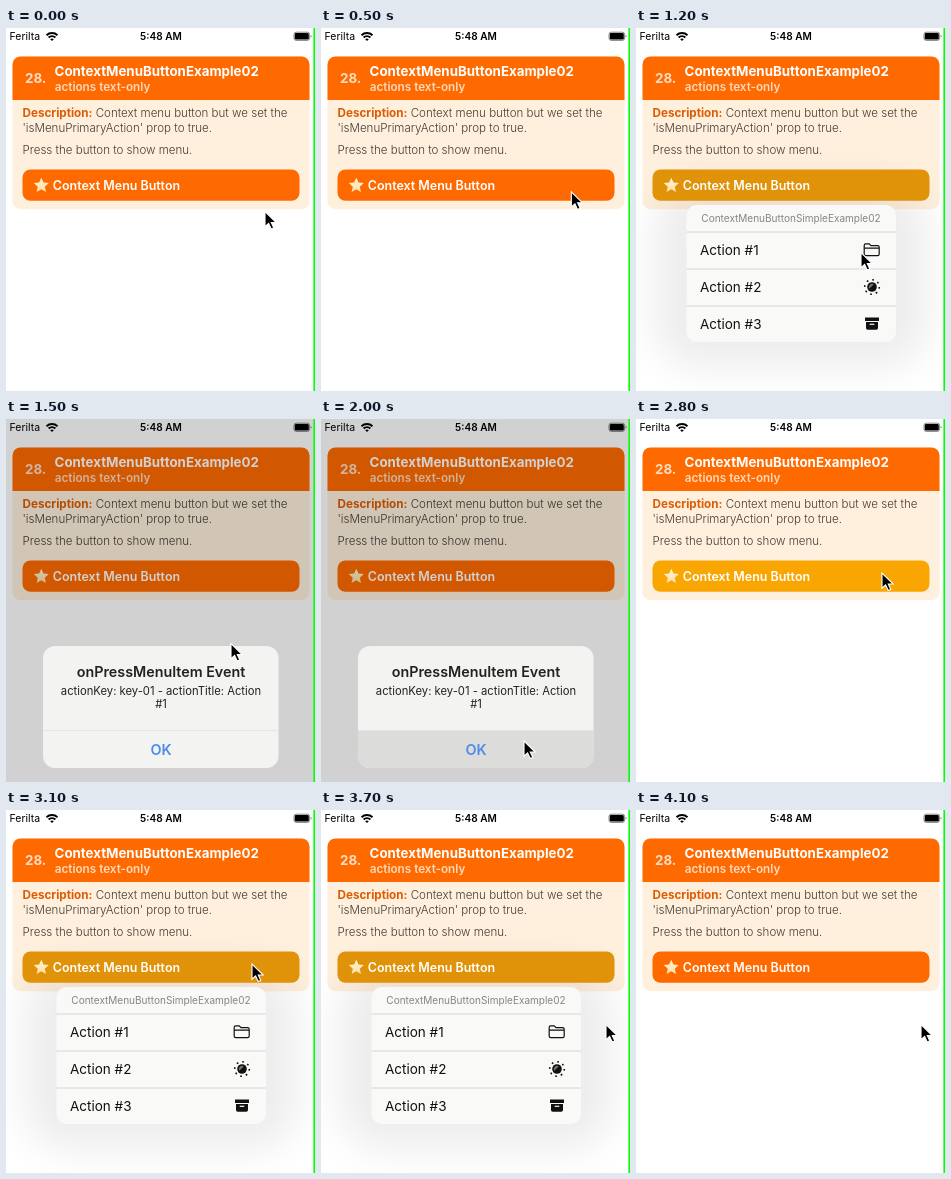
These frames come from a looping animation (309 px wide and 363 px high, 4.2 s). An HTML page:

```html
<!DOCTYPE html>
<html lang="en">
<head>
<meta charset="utf-8">
<title>Context menu button</title>
<style>
html, body { margin: 0; width: 100%; height: 100%; overflow: hidden; background: #fff; }
svg { display: block; width: 309px; height: 363px; font-family: Inter, Roboto, sans-serif; }
.bold { font-weight: 700; }
.semi { font-weight: 600; }
.mid { text-anchor: middle; }
.body { font-size: 11.55px; font-weight: 300; fill: #443a32; }
.item { font-size: 13.5px; fill: #111; }
</style>
</head>
<body>
<svg viewBox="0 0 309 363">
  <defs>
    <linearGradient id="gold" x2="0" y2="1">
      <stop stop-color="#fff4d2"/><stop offset="1" stop-color="#ffe0a8"/>
    </linearGradient>
    <filter id="blur" x="-50%" y="-50%" width="200%" height="200%"><feGaussianBlur stdDeviation="20"/></filter>
  </defs>
  <rect width="309" height="363" fill="#fff"/>

  <g id="status">
    <text x="3.5" y="12.2" font-size="10.5">Ferilta</text>
    <path d="M40.5 7.2a8 8 0 0 1 11 0M42.6 9.5a5 5 0 0 1 6.8 0" fill="none" stroke="#000" stroke-width="1.9"/>
    <path d="M44.2 11.2a2.7 2.7 0 0 1 3.6 0L46 13z"/>
    <text class="semi mid" x="155" y="12.2" font-size="10.1">5:48 AM</text>
    <rect x="288" y="4.2" width="15.6" height="8.2" rx="2.2" fill="none" stroke="#666" stroke-width=".8"/>
    <rect x="288.8" y="5" width="14" height="6.6" rx="1.4"/>
    <path d="M304.6 7v2.6q1-.4 1-1.3t-1-1.3" fill="#777"/>
  </g>

  <g id="card">
    <rect x="6.5" y="28.4" width="297" height="152.8" rx="8" fill="#fff0de"/>
    <path d="M6.5 72V36.4a8 8 0 0 1 8-8H295.5a8 8 0 0 1 8 8V72z" fill="#ff6a00"/>
    <text class="bold" x="19" y="55.2" font-size="13.4" fill="#ffdcc2">28.</text>
    <text class="bold" x="48.6" y="48.2" font-size="13.3" fill="#fff">ContextMenuButtonExample02</text>
    <text class="semi" x="48.8" y="62.5" font-size="11.7" fill="#ffd9bd">actions text-only</text>
    <text class="body" x="16.5" y="89.3"><tspan class="bold" font-size="11.7" fill="#dc5c04">Description:</tspan> Context menu button but we set the</text>
    <text class="body" x="16.5" y="103.5">'isMenuPrimaryAction' prop to true.</text>
    <text class="body" x="16.5" y="125.5">Press the button to show menu.</text>
  </g>

  <rect id="shade" x="18" y="155" width="274" height="185" rx="45" fill="#000" filter="url(#blur)"/>

  <rect id="button" x="16.5" y="141.4" width="277" height="31.4" rx="8"/>
  <path d="M35.3 149.8l2.2 4.7 5.3.6-4 3.6 1.2 5.3-4.7-2.7-4.7 2.7 1.2-5.3-4-3.6 5.3-.6z" fill="url(#gold)"/>
  <text class="semi" x="46.8" y="162" font-size="12.45" fill="#fff">Context Menu Button</text>

  <g id="menu">
    <rect x="50.5" y="177" width="209.5" height="137" rx="10" fill="#f9f9f8"/>
    <text class="mid" x="155" y="194.3" font-size="10.03" fill="#858585">ContextMenuButtonSimpleExample02</text>
    <path d="M50.5 204H260M50.5 241H260M50.5 278H260" stroke="#d2d2d2" stroke-width=".9"/>
    <text class="item" x="64" y="227.3">Action #1</text>
    <text class="item" x="64" y="264.3">Action #2</text>
    <text class="item" x="64" y="301.3">Action #3</text>
    <path d="M228.2 226v-8.6q0-1.6 1.6-1.6h3.4l1.8 1.8h6.6q1.6 0 1.6 1.6v6.8q0 1.6-1.6 1.6H229.8q-1.6 0-1.6-1.6M228.2 220.2H243.2"
          fill="none" stroke="#111" stroke-width="1.2"/>
    <g transform="translate(236 259)">
      <circle r="7.3" fill="none" stroke="#111" stroke-width="1.6" stroke-dasharray="1.7 4.033"/>
      <circle r="4.8" fill="#111"/>
      <path d="M-2.8 1.8A3.4 3.4 0 0 1 1.8 -2.8z" fill="#777"/>
    </g>
    <path d="M229 289.6h14v3.4h-14zM230 293.9h12v6.2q0 1.7-1.7 1.7h-8.6q-1.7 0-1.7-1.7z" fill="#111"/>
    <path d="M233.7 296.3h4.6" stroke="#f9f9f8" stroke-width="1.2"/>
  </g>

  <rect id="dim" width="309" height="363" fill="#000"/>

  <g id="alert">
    <rect x="37" y="227" width="235.5" height="122" rx="12" fill="#f3f3f2"/>
    <path id="ok" d="M37 311.5H272.5V337a12 12 0 0 1-12 12H49a12 12 0 0 1-12-12z" fill="#dcdcdb"/>
    <path d="M37 311.5H272.5" stroke="#e2e2e2" stroke-width=".8"/>
    <g class="mid" fill="#222">
      <text class="semi" x="155" y="258" font-size="14.3">onPressMenuItem Event</text>
      <text x="155" y="276" font-size="11.25">actionKey: key-01 - actionTitle: Action</text>
      <text x="155" y="289.3" font-size="11.25">#1</text>
      <text class="semi" x="155" y="335.5" font-size="14.4" fill="#4f8ce6">OK</text>
    </g>
  </g>

  <path id="cursor" d="M0 0V15.2L3.6 12 6.2 17.6 8.8 16.4 6.3 11H11.2z" stroke="#fff" stroke-width="1.1"/>
  <rect x="307.4" width="1.6" height="363" fill="#0f0"/>
</svg>
<script>
const LOOP = 4200, STEP = 100;
const home = [259, 183.5];
// The pointer's trips: start, end, destination.
const trips = [
  { from: 300, to: 600, spot: [246, 154] },
  { from: 900, to: 1200, spot: [225, 224.5] },
  { from: 1500, to: 1900, spot: [203, 322] },
  { from: 2000, to: 2550, spot: [246, 154] },
  { from: 3300, to: 3700, spot: [285, 214.5] }
];

const el = id => document.getElementById(id);
const ramp = (t, a, b) => Math.min(1, Math.max(0, (t - a) / (b - a)));
const pulse = (t, a, b, c, d) => ramp(t, a, b) - ramp(t, c, d);
const mix = (a, b, p) => a.map((v, i) => v + (b[i] - v) * p);
const fade = (id, v) => el(id).setAttribute("opacity", v);

function scaleFrom(id, x, y, s) {
  el(id).setAttribute("transform", `translate(${x} ${y}) scale(${s}) translate(${-x} ${-y})`);
}

function draw(now) {
  const t = Math.floor(now % LOOP / STEP) * STEP;
  const menu = pulse(t, 600, 900, 1200, 1400) + pulse(t, 2800, 3100, 3700, 4100);
  const press = pulse(t, 500, 600, 1200, 1500) + pulse(t, 2700, 2800, 3800, 4100);
  const alert = ramp(t, 1300, 1500) - .86 * ramp(t, 2000, 2200) - .14 * ramp(t, 2200, 2400);
  const pressed = mix([249, 166, 2], [224, 146, 8], menu);
  const pointer = trips.reduce((p, { from, to, spot }) => mix(p, spot, ramp(t, from, to)), home);

  el("button").setAttribute("fill", `rgb(${mix([255, 106, 0], pressed, press)})`);
  fade("menu", menu);
  scaleFrom("menu", 155, 175, .35 + .65 * menu);
  fade("shade", .07 * menu);
  fade("dim", .18 * pulse(t, 1200, 1500, 2100, 2200));
  fade("alert", alert);
  scaleFrom("alert", 155, 288, 1.12 - .12 * ramp(t, 1300, 1500));
  fade("ok", ramp(t, 1800, 1900));
  el("cursor").setAttribute("transform", `translate(${pointer})`);
}

let start;
function tick(now) {
  start ??= now;
  draw(now - start);
  requestAnimationFrame(tick);
}
draw(0);
requestAnimationFrame(tick);
</script>
</body>
</html>
```
